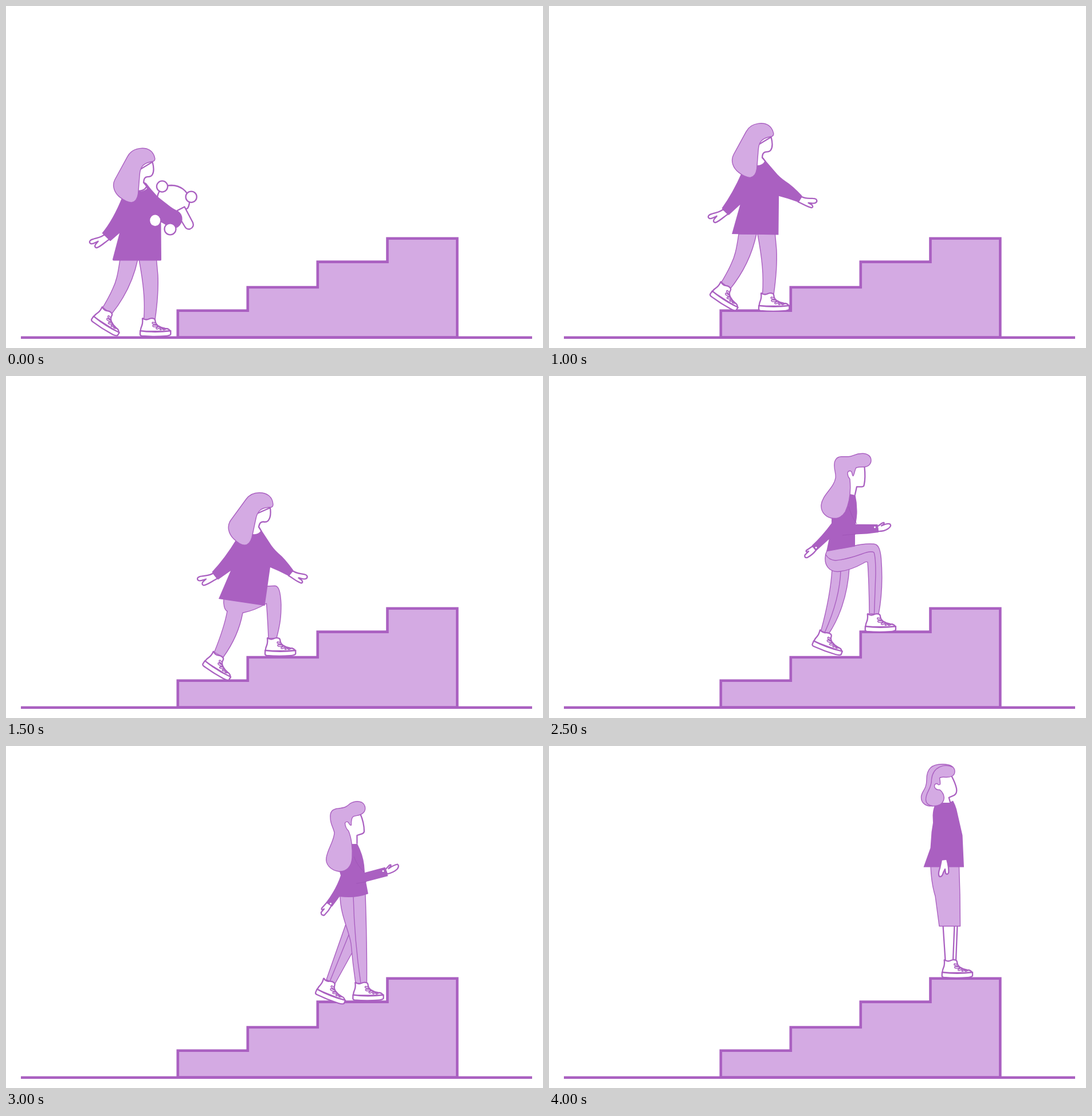
Animation, 937 px wide and 597 px high, one loop 6 s. Source, as an HTML page:

```html
<!DOCTYPE html>
<html lang="en">
<head>
<meta charset="utf-8">
<title>Climbing the steps</title>
<style>
  html, body { margin: 0; width: 100%; height: 100%; overflow: hidden; background: #fff; }
  svg { display: block; width: 100%; height: 100%; }
  .dark { fill: #aa60c1; }
  .light { fill: #d4aae3; stroke: #aa60c1; stroke-width: 1.4; stroke-linejoin: round; }
  .seam { fill: none; stroke: #aa60c1; stroke-width: 1.4; }
  .fold { fill: none; stroke: #a056b8; stroke-width: 1; }
  .skin { fill: #fff; stroke: #aa60c1; stroke-width: 2.3; stroke-linejoin: round; stroke-linecap: round; }
  .lace { fill: #fff; stroke: #aa60c1; stroke-width: 1.6; stroke-linejoin: round; }
  .white { fill: #fff; }
  .steps { fill: #d4aae3; stroke: #aa60c1; stroke-width: 4.6; }
</style>
</head>
<body>
<svg viewBox="0 0 937 597" preserveAspectRatio="none">
  <defs>
    <g id="shoe">
      <path class="skin" d="M0 .5Q1-.5 2.5 1.5Q7 3.5 11 1.5Q16-1 20.5 1Q22.500 2 22.500 6Q23 10 27 13Q33 17 40 18Q47 18 48.500 23L-3.500 23Q-3 17-1 13Q1 8 0 .5Z"/>
      <path class="skin" d="M-3.800 22Q22 25.500 49.300 22V28Q48 30.500 40 31.200Q20 32.600-1 31Q-4 30.500-4 28Z"/>
      <path class="lace" d="M23.500 8.500L18 7Q16 8.500 18.500 10L24 11ZM25.500 12.500L18.500 12Q17 13.500 19.500 15L27 15ZM29 14.500L24 17Q23.500 19.500 26.500 18.800L31 16.500ZM33.500 17L30.500 19Q30.500 21 33 20L35.500 18ZM39 18L36 19.300Q36 21 38.500 20.300L41 18.800Z"/>
    </g>

    <g id="head">
      <path class="skin" d="M332 279C333.500 290 331.500 298 328.500 301.500Q326 304.500 320 303.500Q313.500 303 312 312.500L316.500 320Q311 328 300 326L307 290Z"/>
      <path d="M311 313L314 313L318 321L314.500 323L316 319Z" class="dark"/>
      <path class="light" d="M337 273C336 260 327 252.700 313 252.700C303 252.700 295 257 290 264L263 301C256 311 259 324 268 333C275 340 281 344.300 287.500 344.300C295 344 298 338 300 331L307 298C309.500 286 315 279.500 328 278.500L334 278Q337 277 337 273Z"/>
    </g>
    <path id="handBack" class="skin" d="M232.500 393C227 397.500 221 397 213 398.300C205 399 203 403.500 207 406C210 407.500 214 405 220 403.500L214.500 408.500Q211.500 413 216 414.500C225 412.500 232 406 240 402.500Z"/>
    <path id="handFront" class="skin" d="M371 389C378 394 384 393.500 390 394.800C398 396 398 401 394 403C391 404.500 386 402 381.500 401.500L387 405.500Q390 410 386 410.500C378 408 372 402 364 397.500Z"/>
    <path id="shirt" class="dark" d="M314 314L331 340Q337 350 347 359Q357 367 372 387.500L365 398.500L347 389.500L332 383L322.500 450L242 438L263 389L241 404.500L230.500 391Q253 367 273 334L300 326.500Q309 328 315.500 322.500Z"/>

    <g id="walkLegs">
      <path class="light" d="M199 442C195 470 192 482 186 494C180 508 174 517 169 526L184 538C205 512 222 480 230 442Z"/>
      <path class="light" d="M232 442C240 485 243 515 240.500 547L260 548C264 520 266 490 265 470L262.500 442Z"/>
      <use href="#shoe" transform="translate(168 525) rotate(32.500)"/>
      <use href="#shoe" transform="translate(238 545)"/>
    </g>

    <g id="carry">
      <use href="#walkLegs"/>
      <path class="skin" d="M264 334C266 320 276 313 289 313C304 313.500 316 322 320 336Q321 346 317 353L300 362Z"/>
      <circle class="skin" cx="272.500" cy="315" r="9.600"/>
      <circle class="skin" cx="323.200" cy="333.200" r="9.600"/>
      <path class="skin" d="M299 357L311.500 350.500L326 378Q329 386 321 389.300Q315 390.500 312 385L300 365Z"/>
      <use href="#handBack" transform="translate(222.700 309) rotate(-7.500) translate(-294.700 -310.700)"/>
      <path class="dark" d="M241 307L245 309.500Q259 328 272 340Q284 350 301 358.500Q308.500 364 307.500 374Q305 385 296 388L286 390L277 381Q274 379 270.500 377.500L271 443Q271 444.500 269 444.500H188Q185.500 444.500 186 442L198 396.500L182 410.500L167.500 396.500Q187 373 203 333L231 324Q240 324 246 319Z"/>
      <ellipse class="white" cx="260.200" cy="374.300" rx="9" ry="9.700"/>
      <circle class="skin" cx="286.500" cy="389.300" r="10"/>
      <use href="#head" transform="translate(222.700 308.500) rotate(-7.500) translate(-294.700 -310.700)"/>
    </g>

    <g id="walk">
      <use href="#walkLegs"/>
      <g transform="translate(222.700 309) rotate(-7.500) translate(-294.700 -310.700)">
        <use href="#handBack"/><use href="#handFront"/><use href="#shirt"/><use href="#head"/>
      </g>
    </g>

    <g id="climb">
      <path class="light" d="M251 438C250 448 252 457 257 459.500C253 482 245 505 234.500 531L250 540C268 515 279 490 284 462.500Q306 458 325.500 446Q328 480 329 507L343 507C350 480 351 468 351 448C350 425 347 415.500 340 415.300L326 416Z"/>
      <use href="#shoe" transform="translate(233 529.500) rotate(32)"/>
      <use href="#shoe" transform="translate(327 506)"/>
      <use href="#handBack"/><use href="#handFront"/><use href="#shirt"/><use href="#head"/>
    </g>

    <g id="stride">
      <path class="light" d="M494 336C492 375 484 410 474.500 445L488 450C505 425 521 385 524 335Z"/>
      <path class="seam" d="M509 339C508 375 498 410 481 448"/>
      <path class="light" d="M485 305Q510 300 530 297Q550 292 567 293.300C575 294 578 303 579.500 318C582 350 581 385 575 416L559 415Q558.500 360 556 325Q553 323 548 327Q525 340 503 341.500C488 341 481 330 482 317Q482 311 485 305Z"/>
      <path class="seam" d="M483 312Q488 321 500 322Q520 320 545 311Q562 304.500 567 308Q570 316 570 345L567.500 415"/>
      <use href="#shoe" transform="translate(473 443) rotate(20)"/>
      <use href="#shoe" transform="translate(555.700 415)"/>
      <path class="skin" d="M573 262.500C578 260 581 255.500 584.500 256Q586 258 580 261.500Q591 256.500 595 258.500Q598.500 262 591 267Q584 271.500 574 271Z"/>
      <path class="skin" d="M460 297L449 304.500Q447.500 308.500 453 306L446.500 312.500Q445 318 451 316.800Q460 312 466 304Z"/>
      <path class="dark" d="M526 205L534.500 207.500Q538 223 537.500 240Q537 250 535 258.800L573.500 259L575 273L555 275.500L534 276.500V297.500L484 306.500L488.500 285L466 305.500L458.500 296Q476 280 493 257V240Z"/>
      <path class="fold" d="M523 228Q528 246 537 258M512 278L535 276"/>
      <circle class="white" cx="568.500" cy="264" r="1.500"/>
      <circle class="white" cx="466" cy="299.500" r="1.500"/>
      <path class="white" d="M521 165H529L536 160L550.500 159Q552.500 178 549.500 190Q549 193.500 546 193.500H537L534 208L525 206Z"/>
      <path class="skin" style="fill:none" d="M550.500 159Q552.500 178 549.800 190Q549.500 193.300 546 193.300H537L534 207"/>
      <path class="light" d="M498 158C497 147 502 141 510 140.700H522C530 141 533 135.200 547 135.200C557 135.200 562 141 562 147C562 154 557 158.500 549 158.700Q541 158.500 536 160C533 164 533.500 171 530.500 174.500C528 172 530 166 525 165.500C519.500 166 520 174 525 180C527 200 525 220 517 237C512 245 506 249 497 248.500C484 248 474 238 475 225C477 207 497 196 500 178C501 171 498 165 498 158Z"/>
    </g>

    <g id="stand">
      <path class="light" d="M594 308L559 408L574 415L606 357L602 320Z"/>
      <path class="seam" d="M600 325L565 411"/>
      <path class="light" d="M583 260C583 295 598 320 602 345Q605 380 610 414L629.500 415Q630 350 627 258Z"/>
      <path class="seam" d="M606 262Q608 340 619 414"/>
      <use href="#shoe" transform="translate(554.300 405.300) rotate(21.500)"/>
      <use href="#shoe" transform="translate(609.300 412.500)"/>
      <path class="skin" d="M662 215.500L669 208Q673 206 671 210L667.500 214Q676 208 683 206.500Q687 209 682.500 215Q676 221 665 223.500Z"/>
      <path class="skin" d="M560 273L551 283Q549.500 287.500 555 284.500L549.800 290.500Q550 296.500 555.500 295.300Q563 288 568 278.500Z"/>
      <path class="dark" d="M603 169.500L613 170.500Q623 190 625 208L626 221L661.500 211.500L666.500 227L628 237L632 258Q610 266.500 582 263L569 280.500L558.500 273Q576 250 584 226L580 212Z"/>
      <path class="fold" d="M607 193Q613 209 625 220M611 240L629 237"/>
      <circle class="white" cx="658" cy="218.300" r="1.500"/>
      <circle class="white" cx="566.500" cy="275" r="1.500"/>
      <path class="white" d="M591 132L604 122L618 117Q625 133 625 149Q624.500 152.500 620 153.500L612.500 156V171H603L598 148Z"/>
      <path class="skin" style="fill:none" d="M618 118Q625 134 625 149Q624.500 152.500 620 153.700L612.500 156V170"/>
      <path class="light" d="M566 126C565 115 569 110 580 109C592 107.500 594 106 598 102.500C605 96 615 95.500 621 98.500C628 103 628 112 624 116C619 122 611 121 606 123Q602 126 602.500 138Q600 139 598.500 135Q595 129.500 591.500 134.500Q592 143 597.500 148C603 160 605 180 604 195C603 211 594 219.500 581 219C566 217 557 206 559 195C561 180 573 165 573 151C571 142 566 136 566 126Z"/>
    </g>

    <g id="top">
      <path class="skin" d="M687.500 313L691.500 374M707.500 313L705 374M712.500 313L710 375"/>
      <use href="#shoe" transform="translate(689.700 373)"/>
      <path class="light" d="M666 209Q667 240 674 262L681 314.500H717.500L717 260L715.500 209Z"/>
      <path class="dark" d="M672 105L682 102L688 98.500H699L705 95.500Q709 103 711 110L721.500 156L724 211.500H653.500L665.500 178L667.500 150L670 134L669.500 121Q670 111 673 104Z"/>
      <path class="skin" d="M685 198.500L694 197.500Q698 212 697.300 221Q695 226 692 222L691 215L688 221Q686 229 681.500 228Q678 225 682 213Z"/>
      <path class="white" d="M673 64L692 53L703 53L711 73Q713 82 707 86L697.500 90L700 99H686L688 90L682 77Z"/>
      <path class="skin" style="fill:none" d="M703 53.500Q709 65 711 74Q712.500 82.500 707 86L697.800 90L700 98"/>
      <path class="light" d="M659 58C659 40 668 31.500 686 31.700C702 31.500 708 37 708 44.500C708 52 701 55 692 54.500Q684 53.500 681.500 56Q683 63 682.500 67Q679 69 677.500 65.500Q672.500 65.500 672.500 70.500Q674 77 682 76.500C689 82 690 90 689 93C687 101 680 105 670 104.700C657 106 649 99 649.500 89C650 78 659 77 659 58Z"/>
      <path class="seam" d="M705 37C690 30 670 36 667.500 58C668 75 657 80 657.500 94Q658 103 670 104.700"/>
    </g>
  </defs>

  <rect width="937" height="597" fill="#fff"/>
  <path class="steps" d="M299.800 578.500V531.800H421.800V491H543.800V446.600H665.500V405.800H787.300V578.500Z"/>
  <path class="steps" d="M26 578.700H918"/>
  <use id="girl"/>
</svg>
<script>
  const STEP = 500, LOOP = 6000;
  // pose, shift right, shift down; the last one holds until the loop ends
  const poses = [
    ["carry", 0, 0],
    ["climb", 0, 0],
    ["walk", 132, -44],
    ["climb", 129, -49],
    ["walk", 249, -87],
    ["stride", 0, 0],
    ["stand", 0, 0],
    ["stride", 134, -42],
    ["top", 0, 0]
  ];
  const girl = document.getElementById("girl");
  let shown = -1;

  function draw(time) {
    const i = Math.min(Math.floor((time % LOOP) / STEP), poses.length - 1);
    if (i === shown) return;
    const [name, x, y] = poses[i];
    girl.setAttribute("href", "#" + name);
    girl.setAttribute("transform", `translate(${x} ${y})`);
    shown = i;
  }

  const start = performance.now();
  function tick() {
    draw(performance.now() - start);
    requestAnimationFrame(tick);
  }
  tick();
</script>
</body>
</html>
```
